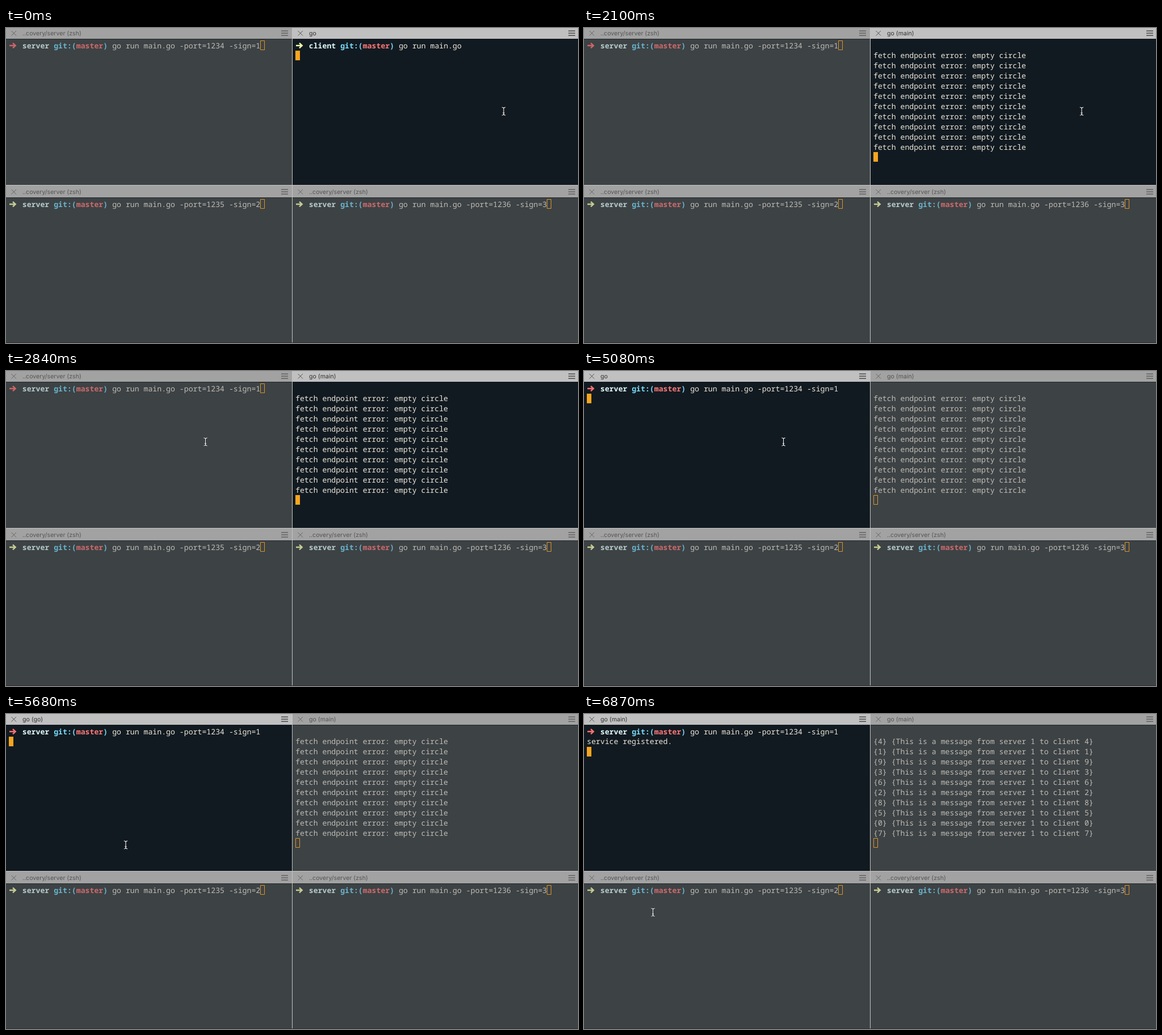
An HTML page with a canvas for the animation above (8000 ms loop, 1008 by 556 pixels).

```html
<!DOCTYPE html>
<html lang="en">
<head>
<meta charset="utf-8">
<title>Four terminals</title>
<style>
  html, body { margin: 0; width: 100%; height: 100%; overflow: hidden; background: #3d4245; }
  canvas { display: block; }
</style>
</head>
<body>
<canvas id="stage" width="1008" height="556"></canvas>
<script>
const ctx = document.getElementById('stage').getContext('2d');
const LOOP = 8000, COLUMN = 7.92, ROW = 17.9;
const MONO = '13.2px "Noto Sans Mono", monospace';
const COLORS = {
  text: '#ebe7da', name: '#e0fafa', git: '#78dcfa', branch: '#ff7878',
  ok: '#f5fcae', failed: '#ff7272', cursor: '#f9a51f'
};
const SHELL = '..covery/server (zsh)';

// [start time, x, y] of the mouse pointer
const POINTER = [
  [0, 877, 147], [2390, 866, 147], [2540, 494, 152], [2690, 406, 137], [2840, 351.5, 125],
  [5380, 343, 132], [5530, 261, 193], [5680, 211, 231], [5830, 133, 339], [5980, 121.5, 350]
];
const ERRORS = Array(10).fill('fetch endpoint error: empty circle');
const MESSAGES = [...'4193628507'].map(n => `{${n}} {This is a message from server 1 to client ${n}}`);

// Value of the last [start, value...] step reached at time t
const stepAt = (steps, t) => steps.filter(step => step[0] <= t).pop();

function rect(color, x, y, w, h) {
  ctx.fillStyle = color;
  ctx.fillRect(x, y, w, h);
}

function stroke(color, width, path) {
  ctx.strokeStyle = color;
  ctx.lineWidth = width;
  ctx.stroke(new Path2D(path));
}

function write(text, column, row, color = COLORS.text, bold = false) {
  ctx.font = (bold ? 'bold ' : '') + MONO;
  ctx.fillStyle = color;
  ctx.fillText(text, 5 + column * COLUMN, 35.5 + row * ROW);
}

function prompt(name, command, color) {
  stroke(color, 2.4, 'M6 31H16M12 26.7L16.7 31L12 35.3');
  write(name, 3, 0, COLORS.name, true);
  write('git:(', 10, 0, COLORS.git, true);
  write('master', 15, 0, COLORS.branch, true);
  write(')', 21, 0, COLORS.git, true);
  write(command, 23, 0);
}

function cursor(column, row, active) {
  const x = Math.round(4.8 + column * COLUMN), y = Math.round(22 + row * ROW);
  if (active) rect(COLORS.cursor, x, y, 8, 17);
  else stroke(COLORS.cursor, 1, `M${x + .5} ${y + .5}h7v16h-7z`);
}

function pane(x, y, active, title, content, cursorColumn, cursorRow) {
  ctx.save();
  ctx.translate(x, y);
  rect(active ? '#121a21' : '#3d4245', 0, 19, 504, 258);
  rect(active ? '#c0c0c0' : '#a2a2a2', 0, -2, 504, 21);
  rect(active ? '#10161b' : '#222628', 0, 19, 504, 1);

  const ink = active ? '#333' : '#555';
  ctx.font = '10.6px Inter, sans-serif';
  ctx.fillStyle = ink;
  ctx.fillText(title, 29, 13);
  stroke(active ? '#555' : '#666', 1, 'M9.5 5L18 13.5M18 5L9.5 13.5');
  const menu = x ? 486 : 485;
  stroke(ink, 1.3, [5.5, 9.5, 13.5].map(line => `M${menu} ${line - .3}h12`).join(''));

  ctx.globalAlpha = active ? 1 : .74;
  content();
  ctx.globalAlpha = active ? 1 : .85;
  cursor(cursorColumn, cursorRow, active);
  ctx.restore();
}

function pointer(x, y) {
  ctx.save();
  ctx.translate(x, y);
  const beam = 'M-3.2 -7Q0 -7 0 -4.5Q0 -7 3.2 -7M0 -4.5V4.5M-3.2 7Q0 7 0 4.5Q0 7 3.2 7M-1.7 3h3.4';
  stroke('rgba(0,0,0,.6)', 2.2, beam);
  stroke('#fff', 1.1, beam);
  ctx.restore();
}

function serverPane(x, y, number, color, active = false, title = SHELL, launched = false, registered = false) {
  pane(x, y, active, title, () => {
    prompt('server', `go run main.go -port=${1233 + number} -sign=${number}`, color);
    if (registered) write('service registered.', 0, 1);
  }, launched ? 0 : 56, registered ? 2 : launched ? 1 : 0);
}

function draw(t) {
  const serverActive = t >= 3280;
  const serverTitle = stepAt([[0, SHELL], [5080, 'go'], [5530, 'go (go)'], [6870, 'go (main)']], t)[1];
  const output = stepAt([[0, null], [900, ERRORS], [6870, MESSAGES]], t)[1];

  rect('#c4c4c4', 0, 0, 1008, 556);
  serverPane(0, 0, 1, COLORS.failed, serverActive, serverTitle, t >= 5080, t >= 6280);
  pane(505, 0, !serverActive, t < 2100 ? 'go' : 'go (main)', () => {
    if (output) output.forEach((line, i) => write(line, 0, i + 1));
    else prompt('client', 'go run main.go', COLORS.ok);
  }, 0, output ? 11 : 1);
  serverPane(0, 280, 2, COLORS.ok);
  serverPane(505, 280, 3, COLORS.ok);
  rect('#2c3032', 0, 555, 1008, 1);
  pointer(...stepAt(POINTER, t).slice(1));
}

ctx.textRendering = 'geometricPrecision';
const start = performance.now();
function tick() {
  draw((performance.now() - start) % LOOP);
  requestAnimationFrame(tick);
}
tick();
</script>
</body>
</html>
```
